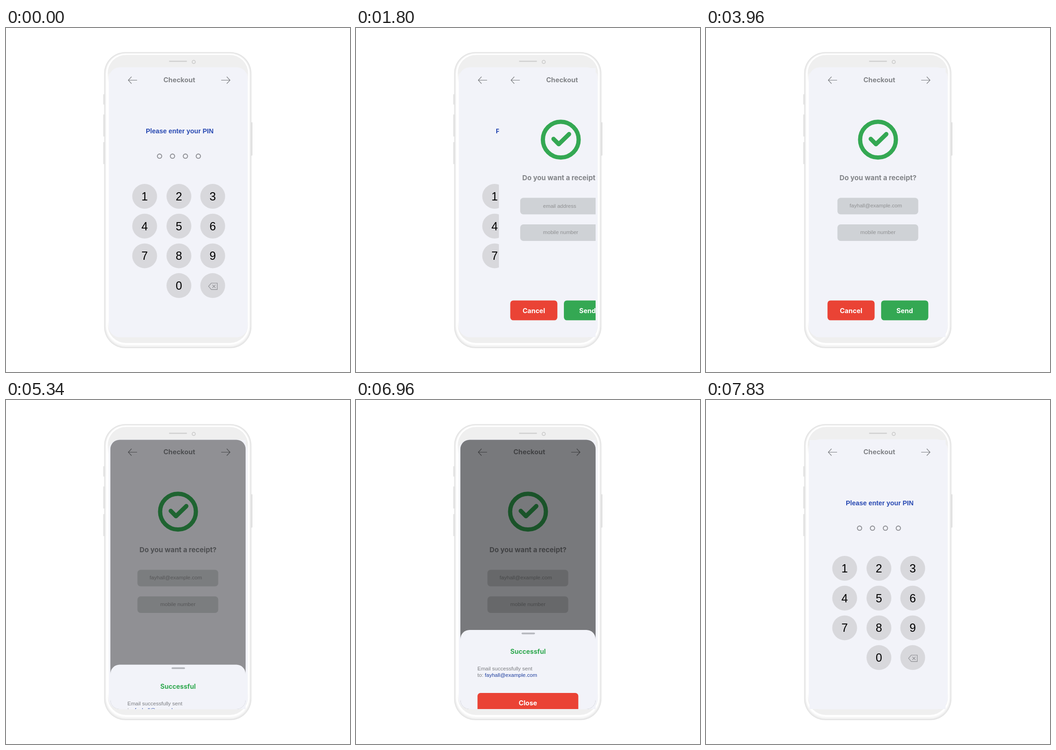
Recreate the animation shown at these times as an HTML page with a canvas. Size 748 px wide and 748 px high, loop 8820 ms.

```html
<!DOCTYPE html>
<html lang="en">
<head>
<meta charset="utf-8">
<title>Checkout</title>
<style>
  html, body { margin: 0; width: 100%; height: 100%; overflow: hidden; background: #fff; }
  canvas { display: block; width: 748px; height: 748px; }
</style>
</head>
<body>
<canvas id="stage"></canvas>
<script>
const SIZE = 748, LOOP = 8820, STEP = 30;
const BG = '#f2f3f9', GREEN = '#34a853', RED = '#ea4335', GREY = '#828488';
const BOLD = 'Inter, Roboto, sans-serif';
const SANS = '"Liberation Sans", Arial, sans-serif';
const EMAIL = 'fayhall@example.com';
const RIGHT = 521, SHEET_TOP = 457;

const canvas = document.getElementById('stage');
const ctx = canvas.getContext('2d');
const ratio = window.devicePixelRatio || 1;
canvas.width = canvas.height = Math.round(SIZE * ratio);

const clamp = v => Math.max(0, Math.min(1, v));
const span = (t, a, b) => clamp((t - a) / (b - a));
const easeOut = (p, n) => 1 - Math.pow(1 - p, n);

function layer(draw) {
  ctx.save();
  draw();
  ctx.restore();
}

function box(x, y, w, h, r, fill) {
  ctx.beginPath();
  ctx.roundRect(x, y, w, h, r);
  if (fill) {
    ctx.fillStyle = fill;
    ctx.fill();
  }
}

function disc(x, y, r, fill) {
  ctx.beginPath();
  ctx.arc(x, y, r, 0, Math.PI * 2);
  ctx.fillStyle = fill;
  ctx.fill();
}

function ring(x, y, r, width, color) {
  ctx.beginPath();
  ctx.arc(x, y, r, 0, Math.PI * 2);
  ctx.lineWidth = width;
  ctx.strokeStyle = color;
  ctx.stroke();
}

function line(points, width, color, close) {
  ctx.beginPath();
  points.forEach(([x, y]) => ctx.lineTo(x, y));
  if (close) ctx.closePath();
  ctx.lineWidth = width;
  ctx.strokeStyle = color;
  ctx.stroke();
}

function text(str, x, y, font, color, align = 'left') {
  ctx.font = font;
  ctx.fillStyle = color;
  ctx.textAlign = align;
  ctx.fillText(str, x, y);
}

const heading = (str, x, y, size, color) =>
  text(str, x, y, `700 ${size}px ${BOLD}`, color, 'center');
const small = (str, x, y, color) => text(str, x, y, `11.55px ${SANS}`, color);

function gradient(x0, y0, x1, y1, stops) {
  const g = ctx.createLinearGradient(x0, y0, x1, y1);
  stops.forEach(([at, color]) => g.addColorStop(at, color));
  return g;
}

function phone() {
  const key = '#e3e3e3';
  box(211.5, 144, 4, 22.5, 1, key);
  box(211.5, 188, 4, 48, 1, key);
  box(211.5, 248, 4, 48, 1, key);
  box(532, 205, 4, 72.5, 1, key);

  box(213.5, 52.5, 320, 643.5, 46, '#dddddd');
  box(214.5, 53.5, 318, 641.5, 45, '#ebebeb');
  box(216.5, 55, 314, 637.5, 44, '#f7f7f7');
  box(218, 56, 311, 633, 42, '#ffffff');
  box(221, 58.5, 305.5, 626.5, 40, '#efefef');
  box(221, 96, 305.5, 564, 0, gradient(0, 96, 0, 660, [
    [0, 'rgba(255,255,255,0)'], [0.04, '#fff'], [0.96, '#fff'], [1, 'rgba(255,255,255,0)']
  ]));
  box(255, 686, 238, 2, 1, gradient(255, 0, 493, 0, [
    [0, 'rgba(255,255,255,0)'], [0.4, '#fff'], [1, 'rgba(255,255,255,0)']
  ]));

  box(354.5, 71.2, 39, 2.2, 1, '#cdcdcd');
  ring(408.2, 73.7, 3.5, 1.5, '#c8c8c8');
  box(223.5, 85.5, 302, 587, 24, BG);
}

function header() {
  const ink = '#77797d';
  heading('Checkout', 376.7, 117.8, 14.7, GREY);
  line([[285, 113.5], [266, 113.5]], 1.1, ink);
  line([[273, 106], [265.8, 113.5], [273, 121]], 1.1, ink);
  line([[468, 113.5], [487, 113.5]], 1.1, ink);
  line([[480, 106], [487.2, 113.5], [480, 121]], 1.1, ink);
}

function pinPage(filled) {
  const ink = '#8a8b90', cols = [301.5, 376, 449.5];
  header();
  text('Please enter your PIN', 377.7, 229.4, `700 14.35px ${SANS}`, '#2849b2', 'center');
  for (let i = 0; i < 4; i++) {
    const x = 333.9 + i * 28.1;
    ring(x, 278.7, 4.7, 1.9, ink);
    if (i < filled) disc(x, 278.7, 4.2, ink);
  }
  for (let i = 0; i < 12; i++) {
    if (i === 9) continue;
    const x = cols[i % 3], y = 366 + Math.floor(i / 3) * 64.7;
    disc(x, y, 27, '#d8d8dc');
    if (i < 11) {
      text(String((i + 1) % 11), x, y + 8.8, `25px ${SANS}`, '#000', 'center');
    }
  }
  line([[440.3, 561.6], [446.3, 554.8], [459.4, 554.8], [459.4, 568.6], [446.3, 568.6]], 1.1, ink, true);
  line([[448.8, 558.3], [455.4, 565]], 1.1, ink);
  line([[455.4, 558.3], [448.8, 565]], 1.1, ink);
}

function button(label, x, y, w, color, press = 0) {
  layer(() => {
    const cx = x + w / 2, cy = y + 21.6, k = 1 - 0.06 * press;
    ctx.translate(cx, cy);
    ctx.scale(k, k);
    box(-w / 2, -21.6, w, 43.2, 6.5, color);
    heading(label, 0, 5.8, 14.4, '#fff');
  });
}

function typed(str, x, y, progress, color) {
  for (let i = 0; i < str.length; i++) {
    ctx.globalAlpha = clamp(progress * str.length - i);
    if (ctx.globalAlpha === 0) break;
    ctx.font = `11.55px ${SANS}`;
    small(str[i], x + ctx.measureText(str.slice(0, i)).width, y, color);
  }
  ctx.globalAlpha = 1;
}

function receiptPage(t) {
  const ink = '#8f9092';
  header();
  ring(374, 242.8, 38.9, 9.2, GREEN);
  layer(() => {
    ctx.lineCap = ctx.lineJoin = 'round';
    line([[358.3, 241.2], [369.6, 252.6], [392, 230.8]], 9.4, GREEN);
  });
  heading('Do you want a receipt?', 374, 330.6, 15.1, GREY);
  box(285.8, 369.3, 175.7, 36, 7, '#cfd2d6');
  box(285.8, 427, 175.7, 36, 7, '#cfd2d6');
  if (t < 2820) small('email address', 335.6, 391.2, ink);
  else typed(EMAIL, 312.3, 390.2, span(t, 3030, 3960), ink);
  small('mobile number', 335.6, 447.6, ink);
  button('Cancel', 264.2, 592.4, 102.4, RED);
  button('Send', 380.8, 592.4, 102.6, GREEN, pulse(t, 4440, 4830));
}

const pulse = (t, a, b) => Math.sin(Math.PI * span(t, a, b)) ** 2;

function sheet(t) {
  if (t <= 5040 || t >= 7410) return;
  const opening = easeOut(span(t, 5040, 5580), 1.4);
  const closing = span(t, 6870, 7410);
  const top = SHEET_TOP + (1 - opening) * 369 + closing * 258;
  layer(() => {
    box(227, 86.5, 294, 585.5, 20);
    ctx.clip();
    ctx.fillStyle = `rgba(0,0,0,${0.6 * opening * (1 - closing)})`;
    ctx.fillRect(227, 86, 294, 586);
    ctx.translate(0, top);
    box(227, 0, 294, 260, 20, BG);
    box(360, 5.8, 29.2, 3.6, 1.8, '#b6b8be');
    heading('Successful', 374, 52.2, 14.1, '#2fa84f');
    small('Email successfully sent', 264, 88, '#7c7e82');
    small('to: ', 264, 102.4, '#7c7e82');
    small(EMAIL, 280, 102.4, '#1f3f9f');
    button('Close', 264.2, 137, 219.2, RED, pulse(t, 6300, 6750));
  });
}

// Draws a page on its own backing, shifted right by `shift`.
function slide(edge, shift, page) {
  layer(() => {
    ctx.beginPath();
    ctx.rect(edge + shift, 87, Math.max(0, RIGHT - edge - shift), 585);
    ctx.clip();
    ctx.fillStyle = BG;
    ctx.fill();
    ctx.translate(shift, 0);
    page();
  });
}

function draw(t) {
  ctx.setTransform(ratio, 0, 0, ratio, 0, 0);
  ctx.fillStyle = '#fff';
  ctx.fillRect(0, 0, SIZE, SIZE);
  phone();
  if (t < 1920) pinPage([300, 570, 840, 1080].filter(at => t >= at).length);
  if (t > 1590 && t < 7830) {
    const p = easeOut(span(t, 1590, 1920), 1.36);
    slide(239.3, 282 * (1 - p), () => receiptPage(t));
    sheet(t);
  }
  if (t > 7530) {
    const p = easeOut(span(t, 7530, 7830), 1.54);
    slide(224.8, 296 * (1 - p), () => pinPage(0));
  }
}

const start = performance.now();
function tick() {
  const t = (performance.now() - start) % LOOP;
  draw(Math.floor(t / STEP) * STEP);
  requestAnimationFrame(tick);
}
tick();
</script>
</body>
</html>
```
